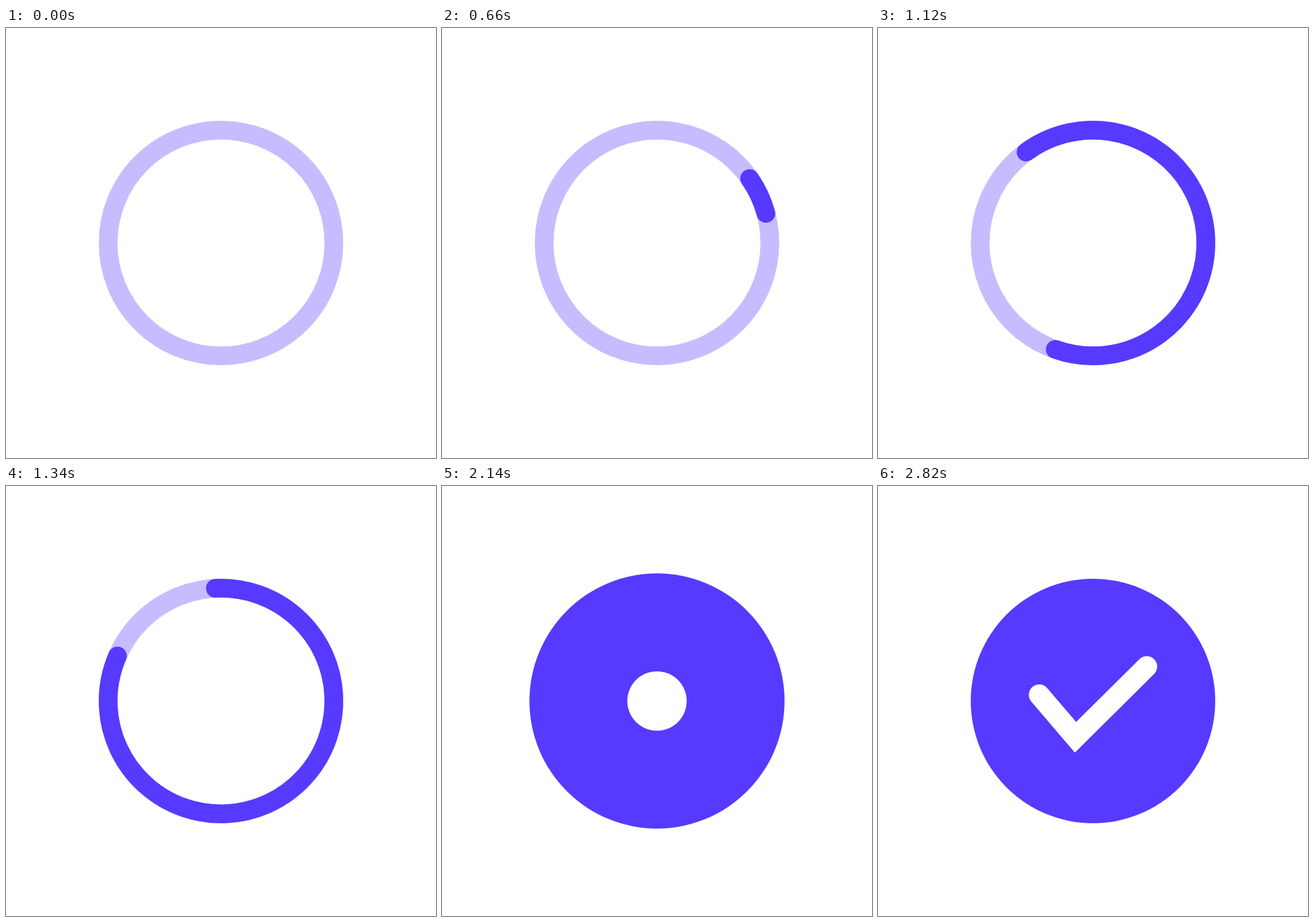
An HTML page with a canvas for the animation above (4000 ms loop, 700 by 700 pixels).

```html
<!DOCTYPE html>
<html lang="en">
<head>
<meta charset="utf-8">
<title>Loading ring to check mark</title>
<style>
html, body { margin: 0; height: 100%; overflow: hidden; background: #fff; }
canvas { display: block; }
</style>
</head>
<body>
<canvas id="stage" width="700" height="700"></canvas>
<script>
const ctx = document.getElementById("stage").getContext("2d");
const LOOP = 4000, TAU = Math.PI * 2;
const DARK = "#563aff", LIGHT = "#c7bcff";
const OUTER = 199, INNER = 168.5;
const CHECK = [[-87.5, -10], [-28.5, 59], [87.5, -56]];

const clamp = x => Math.min(1, Math.max(0, x));
const span = (t, start, length) => clamp((t - start) / length);

// Cubic Bezier easing with control points (x1, 0) and (x2, 1)
function ease(x, x1, x2) {
  let lo = 0, hi = 1;
  for (let i = 0; i < 24; i++) {
    const u = (lo + hi) / 2, v = 1 - u;
    if (3 * u * v * v * x1 + 3 * u * u * v * x2 + u * u * u < x) lo = u;
    else hi = u;
  }
  return lo * lo * (3 - 2 * lo);
}

function ring(inner, color, from = 0, to = TAU) {
  ctx.beginPath();
  ctx.arc(0, 0, (OUTER + inner) / 2, from, to);
  ctx.lineWidth = OUTER - inner;
  ctx.strokeStyle = color;
  ctx.stroke();
}

function disc(radius, color) {
  ctx.beginPath();
  ctx.arc(0, 0, radius, 0, TAU);
  ctx.fillStyle = color;
  ctx.fill();
}

function spinner(t) {
  ring(INNER, LIGHT);
  if (t <= 400) return;
  const head = 2 * TAU * ease(span(t, 400, 1496), 0.394, 0.159) - TAU / 4;
  const length = TAU * ease(span(t, 400, 1866), 0.42, 0.106);
  ctx.lineCap = "round";
  ring(INNER, DARK, head - length, head);
}

function check(part) {
  if (part <= 0) return;
  const [a, b, c] = CHECK;
  const dist = (p, q) => Math.hypot(q[0] - p[0], q[1] - p[1]);
  const first = dist(a, b), second = dist(b, c);
  const drawn = part * (first + second);
  const lineTo = (p, q, k) =>
    ctx.lineTo(p[0] + (q[0] - p[0]) * k, p[1] + (q[1] - p[1]) * k);
  ctx.beginPath();
  ctx.moveTo(...a);
  lineTo(a, b, clamp(drawn / first));
  if (drawn > first) lineTo(b, c, clamp((drawn - first) / second));
  ctx.lineWidth = 34;
  ctx.lineCap = "round";
  ctx.lineJoin = "miter";
  ctx.strokeStyle = "#fff";
  ctx.stroke();
}

function badge(t) {
  const grow = ease(span(t, 2020, 190), 0.42, 0.58);
  const settle = ease(span(t, 2210, 400), 0.42, 0.58);
  const scale = 1 + 0.06 * (grow - settle);
  ctx.scale(scale, scale);
  disc(OUTER, DARK);
  if (grow < 1) disc(INNER * (1 - grow), "#fff");
  check(ease(span(t, 2200, 620), 0.4, 0.15));
}

function draw(t) {
  ctx.fillStyle = "#fff";
  ctx.fillRect(0, 0, 700, 700);
  ctx.save();
  ctx.translate(350, 350);
  if (t < 2020) spinner(t);
  else badge(t);
  ctx.restore();
}

const begin = performance.now();
function tick() {
  draw((performance.now() - begin) % LOOP);
  requestAnimationFrame(tick);
}
tick();
</script>
</body>
</html>
```
